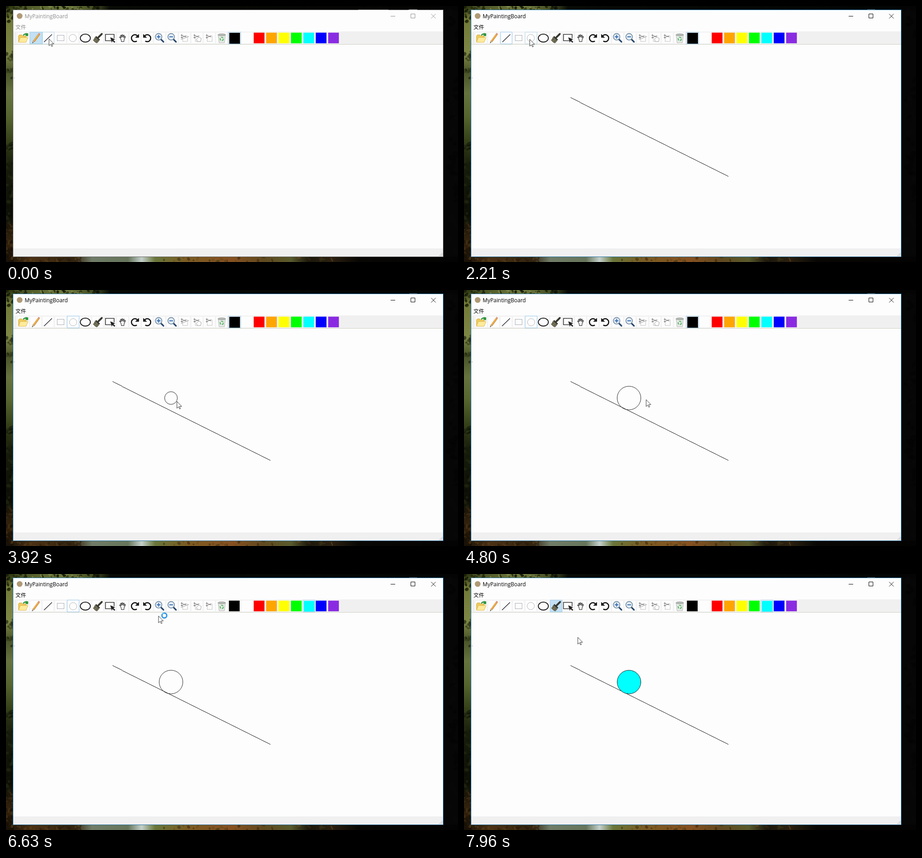
These frames come from a looping animation (993 px wide and 564 px high, 8000 ms). An HTML page:

```html
<!DOCTYPE html>
<html lang="zh">
<head>
<meta charset="utf-8">
<title>MyPaintingBoard</title>
<style>
html, body { margin: 0; width: 100%; height: 100%; overflow: hidden; background: #050604; }
svg { display: block; width: 993px; height: 564px; }
.title { font: 11.85px "Open Sans", "Noto Sans", sans-serif; }
.menu { font: 11.7px "Noto Sans CJK SC", "Noto Sans CJK", sans-serif; }
.ink { fill: none; stroke: #000; }
.tile { fill: #fdfdfe; }
.checked { stroke: #9dcdee; }
.blue { fill: #c3e0f4; }
.hover { fill: none; stroke: #c2e0f0; }

.state { opacity: 0; animation: 8s step-end infinite; }
#inactive { animation-name: inactive; }
#pencilOn, #lineHover { animation-name: firstTool; }
#lineOn { animation-name: lineOn; }
#circleHover { animation-name: circleHover; }
#circleOn { animation-name: circleOn; }
#brushOn { animation-name: brushOn; }
#blackOn { animation-name: blackOn; }
#cyanOn { animation-name: cyanOn; }
#greenHover { animation-name: greenHover; }
#busy { animation-name: busy; }
@keyframes inactive { 0% { opacity: 1 } 1.625%, 100% { opacity: 0 } }
@keyframes firstTool { 0% { opacity: 1 } 2.8%, 100% { opacity: 0 } }
@keyframes lineOn { 2.8% { opacity: 1 } 30%, 100% { opacity: 0 } }
@keyframes circleHover { 26.5% { opacity: 1 } 30%, 100% { opacity: 0 } }
@keyframes circleOn { 30% { opacity: 1 } 87.8%, 100% { opacity: 0 } }
@keyframes brushOn { 87.8%, 100% { opacity: 1 } }
@keyframes blackOn { 0% { opacity: 1 } 75%, 100% { opacity: 0 } }
@keyframes cyanOn { 75%, 100% { opacity: 1 } }
@keyframes greenHover { 69.5% { opacity: 1 } 71.5%, 100% { opacity: 0 } }
@keyframes busy { 75.2% { opacity: 1 } 84%, 100% { opacity: 0 } }

#cursor { animation: pointer 8s ease-in-out infinite; }
@keyframes pointer {
  0%, 3% { transform: translate(94px, 72px) }
  10% { transform: translate(301px, 226px) }
  12.5%, 14% { transform: translate(234px, 202px) }
  21%, 22.5% { transform: translate(580px, 375px) }
  27.2%, 31% { transform: translate(144px, 73px) }
  41%, 44.5% { transform: translate(362px, 238px) }
  49% { transform: translate(375px, 245px) }
  54%, 58% { transform: translate(386px, 250px) }
  70.4% { transform: translate(642px, 82px) }
  73.5%, 75.5% { transform: translate(667px, 76px) }
  82.9% { transform: translate(334.5px, 92px) }
  86.5%, 88.5% { transform: translate(203px, 74px) }
  92.5%, 94.5% { transform: translate(362px, 238px) }
  99.3%, 100% { transform: translate(249.5px, 139px) }
}
#slope { stroke-width: .89; shape-rendering: crispEdges; stroke-dasharray: 1 2; animation: slope 8s ease-in-out infinite; }
@keyframes slope { 0%, 14% { stroke-dashoffset: 1.01 } 21%, 100% { stroke-dashoffset: 0 } }
#ball { stroke-width: .85; animation: grow 8s ease-in-out infinite, fill 8s step-end infinite; }
@keyframes grow { 0%, 44.5% { r: 0 } 49% { r: 14px } 54%, 100% { r: 26px } }
@keyframes fill { 0% { fill: none } 93.6%, 100% { fill: #0ff } }
</style>
</head>
<body>
<svg viewBox="0 0 993 564">
  <defs>
    <linearGradient id="left" x2="0" y2="1">
      <stop offset="0" stop-color="#2c3411"/><stop offset=".05" stop-color="#717a38"/>
      <stop offset=".18" stop-color="#7d8645"/><stop offset=".26" stop-color="#4a5429"/>
      <stop offset=".34" stop-color="#66733f"/><stop offset=".43" stop-color="#56652f"/>
      <stop offset=".53" stop-color="#343f18"/><stop offset=".62" stop-color="#181d0b"/>
      <stop offset=".82" stop-color="#0d0e06"/><stop offset=".92" stop-color="#35240f"/>
      <stop offset="1" stop-color="#171006"/>
    </linearGradient>
    <linearGradient id="top">
      <stop offset="0" stop-color="#3a431a"/><stop offset=".13" stop-color="#727d40"/>
      <stop offset=".2" stop-color="#3d471e"/><stop offset=".23" stop-color="#080a04"/>
      <stop offset="1" stop-color="#030403"/>
    </linearGradient>
    <linearGradient id="bottom">
      <stop offset="0" stop-color="#1a1207"/><stop offset=".06" stop-color="#4a3014"/>
      <stop offset=".15" stop-color="#33240f"/><stop offset=".19" stop-color="#707c68"/>
      <stop offset=".27" stop-color="#66755a"/><stop offset=".3" stop-color="#c3cfca"/>
      <stop offset=".33" stop-color="#69763a"/><stop offset=".4" stop-color="#7b5b22"/>
      <stop offset=".5" stop-color="#865020"/><stop offset=".57" stop-color="#60491f"/>
      <stop offset=".63" stop-color="#595a2c"/><stop offset=".67" stop-color="#1b170b"/>
      <stop offset=".72" stop-color="#2b2010"/><stop offset=".78" stop-color="#080704"/>
      <stop offset="1" stop-color="#030303"/>
    </linearGradient>
  </defs>

  <rect width="993" height="564" fill="#050605"/>
  <rect width="993" height="10" fill="url(#top)"/>
  <rect y="552" width="993" height="12" fill="url(#bottom)"/>
  <rect width="17" height="564" fill="url(#left)"/>
  <g id="foliage"></g>
  <rect x="886" y="7" width="17" height="1" fill="#555"/>

  <rect x="15.5" y="8.5" width="945" height="544" fill="#fdfdfe" stroke="#2474a6"/>
  <rect x="16" y="56" width="944" height="28" fill="#f3f3f4"/>
  <rect x="735" y="56" width="225" height="28" fill="#f0f0f1"/>
  <path d="M16 84.5H960" stroke="#cdd0bf"/>
  <rect x="16" y="534" width="944" height="18" fill="#f0f0f1"/>
  <path d="M20 59V82" stroke="#c5c5c5" stroke-dasharray="1 2"/>
  <path d="M952 550h7M955 547.5h4M957 545h2" stroke="#aaa" stroke-dasharray="2 1"/>
  <rect x="17" y="158" width="2" height="1" fill="#999"/>

  <circle cx="30" cy="22" r="6.3" fill="#b09a76"/>
  <text class="title" x="41" y="26.7">MyPaintingBoard</text>
  <text class="menu" x="20.7" y="50.8">文件</text>
  <path class="ink" d="M845 22.5h10M889.5 17.5h9v9h-9z"/>
  <path d="M934 17.5l10 10M944 17.5l-10 10" stroke="#111"/>

  <g id="tiles"></g>

  <g id="folder">
    <path d="M27.5 79V65.5l2-2h5l2 2.5h8V79z" fill="#efcb5c" stroke="#d2a840"/>
    <path d="M27.5 80l4-10.5h17L44 80z" fill="#fdeb9c" stroke="#dfb950"/>
    <path d="M38 65q2-4 7-3.5" fill="none" stroke="#31963c" stroke-width="2.4"/>
    <path d="M43.5 59.5L49 60.5 48.5 67 42.5 65z" fill="#31963c"/>
  </g>
  <g id="pencil">
    <path d="M60.5 78L72.5 61.5" stroke="#b57c35" stroke-width="4"/>
    <path d="M60.5 77.5L71.5 62.5" stroke="#fbb546" stroke-width="2.4"/>
    <path d="M71.8 62.3L73.3 60.2" stroke="#d89a90" stroke-width="3.8"/>
    <path d="M57.5 81.5L58.8 76.5l3.2 2.3z" fill="#e8cda0" stroke="#806040" stroke-width=".5"/>
    <path d="M57.3 81.7l.5-2.5 1.6 1.1z" fill="#222"/>
  </g>
  <path id="lineIcon" d="M83.5 79.5L101 62.5" stroke="#16161e" stroke-width="1.2"/>
  <rect x="112.5" y="64.5" width="15" height="12" fill="none" stroke="#a9aeb1"/>
  <circle id="circleIcon" cx="146.7" cy="70.5" r="8" fill="none" stroke="#b2b5b7"/>
  <ellipse cx="174.3" cy="70.7" rx="11" ry="8.8" fill="none" stroke="#111" stroke-width="1.8"/>
  <g id="brush">
    <path d="M203 69L210.5 61.5" stroke="#38382f" stroke-width="4" stroke-linecap="round"/>
    <path d="M198 66l8.5 8-2 2.5-8.5-8z" fill="#343429"/>
    <path d="M195.5 69l8.5 8-4 4.5q-4-.5-8.5-6.5 2.5-1 4-6z" fill="#77745a" stroke="#45432f"/>
    <path d="M195 75l2-3M198.5 78.5l2.5-3" stroke="#3c3a2b"/>
  </g>
  <path d="M231 76.5H218.5v-14h19V71" fill="none" stroke="#333" stroke-width="1.6"/>
  <path d="M229 69l11 4.5-4 1.5 4 4-2 2-4-4-1.5 4z" fill="#222"/>
  <path d="M252 72l-2.5-3.2q.5-1.5 2.5.2l1 1.2-1.5-5.2q1-1.5 2 .3l1.3 3.7-.3-5.3q1-1.4 1.8 0l.7 5 1.2-4.4q1.3-.9 1.6.5l-.8 5 2.3-2.7q1.5-.2 1 1.4L259.5 74l-.5 4.5h-5.5q0-3-1.5-6.5z" fill="#fff" stroke="#222" stroke-width="1.1"/>
  <g id="redo">
    <path d="M287.5 77.2A7.6 7.6 0 1 1 289 66" fill="none" stroke="#111" stroke-width="2.5"/>
    <path d="M292.2 61.5v8.2h-8.5z" fill="#111"/>
  </g>
  <use href="#redo" transform="translate(593.5) scale(-1 1)"/>
  <g id="lens">
    <path d="M340.5 73.5L346 79" stroke="#29486b" stroke-width="3.2" stroke-linecap="round"/>
    <circle cx="335.3" cy="67.8" r="7.2" fill="#e4eef7" stroke="#6d879f" stroke-width="1.6"/>
    <path d="M331.3 67.8h8" stroke="#3569ad" stroke-width="2"/>
  </g>
  <path d="M335.3 63.8v8" stroke="#3569ad" stroke-width="2"/>
  <use href="#lens" x="27.5"/>
  <g id="scissors" fill="none" stroke="#555">
    <path d="M387 65l9 3.5M387 69l9-3.5" stroke-width=".8"/>
    <circle cx="386" cy="64.5" r="1.3"/><circle cx="386" cy="69.5" r="1.3"/>
  </g>
  <use href="#scissors" x="28"/>
  <use href="#scissors" x="55"/>
  <g fill="none" stroke="#8c8c8c" stroke-width=".8">
    <path d="M388 70v8h11V66h-6M416 70v8h5M422 66h4M442 70v8h11V66h-4" stroke-dasharray="2 1"/>
    <path d="M384 74l18-7M418.5 73l5-4.5 5.5 3-1.5 7h-7z"/>
  </g>
  <g id="bin">
    <path d="M466 64h16l-2 17h-12z" fill="#e6e9e6" stroke="#b5bab5"/>
    <ellipse cx="474" cy="63.5" rx="8.5" ry="2.2" fill="#b9beb9" stroke="#8d938e"/>
    <circle cx="474" cy="72.5" r="3.5" fill="none" stroke="#55b565" stroke-width="2.2" stroke-dasharray="5 2.3"/>
  </g>
  <g id="swatches"></g>

  <g id="pencilOn" class="state"><rect class="checked blue" x="52.5" y="57.5" width="27" height="26"/><use href="#pencil" x=".7"/></g>
  <rect id="lineHover" class="state hover" x="80.5" y="57.5" width="25" height="26"/>
  <g id="lineOn" class="state"><rect class="tile checked" x="80.5" y="57.5" width="25" height="26"/><use href="#lineIcon" x=".7"/></g>
  <rect id="circleHover" class="state hover" x="134.5" y="57.5" width="26" height="26"/>
  <g id="circleOn" class="state"><rect class="tile checked" x="134.5" y="57.5" width="26" height="26"/><use href="#circleIcon" x=".8" y=".5"/></g>
  <g id="brushOn" class="state"><rect class="checked blue" x="189.5" y="57.5" width="26" height="26"/><use href="#brush" x=".7"/></g>
  <g id="blackOn" class="state"><rect class="tile checked" x="488.5" y="57.5" width="27" height="26"/><rect x="490.5" y="59" width="23.5" height="24"/></g>
  <g id="cyanOn" class="state"><rect class="tile checked" x="652.5" y="57.5" width="26" height="26"/><rect x="654.2" y="59.2" width="23.5" height="23.5" fill="#0ff"/></g>
  <rect id="greenHover" class="state hover" x="625.5" y="57.5" width="25" height="26"/>

  <path id="slope" class="ink" pathLength="1" d="M233.5 201.5L580.5 375.5"/>
  <circle id="ball" class="ink" cx="362.5" cy="238" r="0"/>

  <g id="inactive" class="state">
    <rect x="15.5" y="8.5" width="945" height="544" fill="none" stroke="#666"/>
    <path d="M774 8.5h66M884 8.5h20" stroke="#bbb"/>
    <path d="M41 13h100v18H41zM20 38h26v16H20zM843 15h104v15H843z" fill="#fdfdfe" opacity=".56"/>
  </g>

  <g id="cursor">
    <path d="M.5.5V15.5L4 12.3 6.4 17.2 8.4 16.3 6.1 11.4H11z" fill="#fff" stroke="#222" stroke-width=".9"/>
    <g id="busy" class="state" fill="none">
      <circle cx="13.3" cy="-.5" r="5.3" stroke="#1f8fe3" stroke-width="2.8"/>
      <path d="M8.8-3.5A5.3 5.3 0 0 1 13.3-5.8" stroke="#62c3f5" stroke-width="2.5"/>
    </g>
  </g>
</svg>
<script>
const byId = id => document.getElementById(id);
const pitch = 27.25;
const rect = (x, y, w, h, fill) => `<rect x="${x}" y="${y}" width="${w}" height="${h}" fill="${fill}"/>`;

byId('tiles').innerHTML = Array.from({ length: 17 }, (_, i) =>
  rect(26 + i * pitch, 59, 24, 23, '#fdfdfe')).join('');

const paints = ['#000', '#fdfdfe', '#f00', '#ffa500', '#ff0', '#0f0', '#0ff', '#00f', '#8a2be2'];
byId('swatches').innerHTML = paints.map((paint, i) =>
  rect(489.8 + i * pitch, 58.7, 23.5, 23.5, paint)).join('');

let seed = 17;
const random = () => (seed = (seed * 16807) % 2147483647) / 2147483647;

// Scatter small leaf-like blobs over one strip of the wallpaper.
function scatter(count, x, y, w, h, size, colors) {
  return Array.from({ length: count }, () => {
    const cx = x + random() * w, cy = y + random() * h;
    const rx = size * (.4 + random()), ry = size * (.3 + random() * .6);
    const color = colors[Math.floor(random() * colors.length)];
    return `<ellipse cx="${cx}" cy="${cy}" rx="${rx}" ry="${ry}" fill="${color}" opacity=".6"
      transform="rotate(${random() * 180} ${cx} ${cy})"/>`;
  }).join('');
}
byId('foliage').innerHTML =
  scatter(42, 0, 0, 205, 8, 4, ['#0b0f04', '#1a2009', '#8a9350']) +
  scatter(14, 0, 0, 16, 34, 4, ['#0c1004', '#1a2009']) +
  scatter(10, 0, 100, 16, 22, 4, ['#12170a', '#303818']) +
  scatter(10, 0, 138, 16, 22, 4, ['#12170a', '#303818']) +
  scatter(40, 0, 290, 16, 190, 5, ['#0a0d05', '#252c12', '#11150a']) +
  scatter(25, 0, 475, 16, 85, 4, ['#4a3213', '#120d05']) +
  scatter(30, 0, 554, 180, 10, 4, ['#2a1d0b', '#5c3d18']) +
  scatter(30, 340, 554, 380, 10, 4, ['#3a270f', '#6c481c', '#3c3415']) +
  scatter(40, 970, 0, 23, 564, 8, ['#080908', '#020302']);
</script>
</body>
</html>
```
